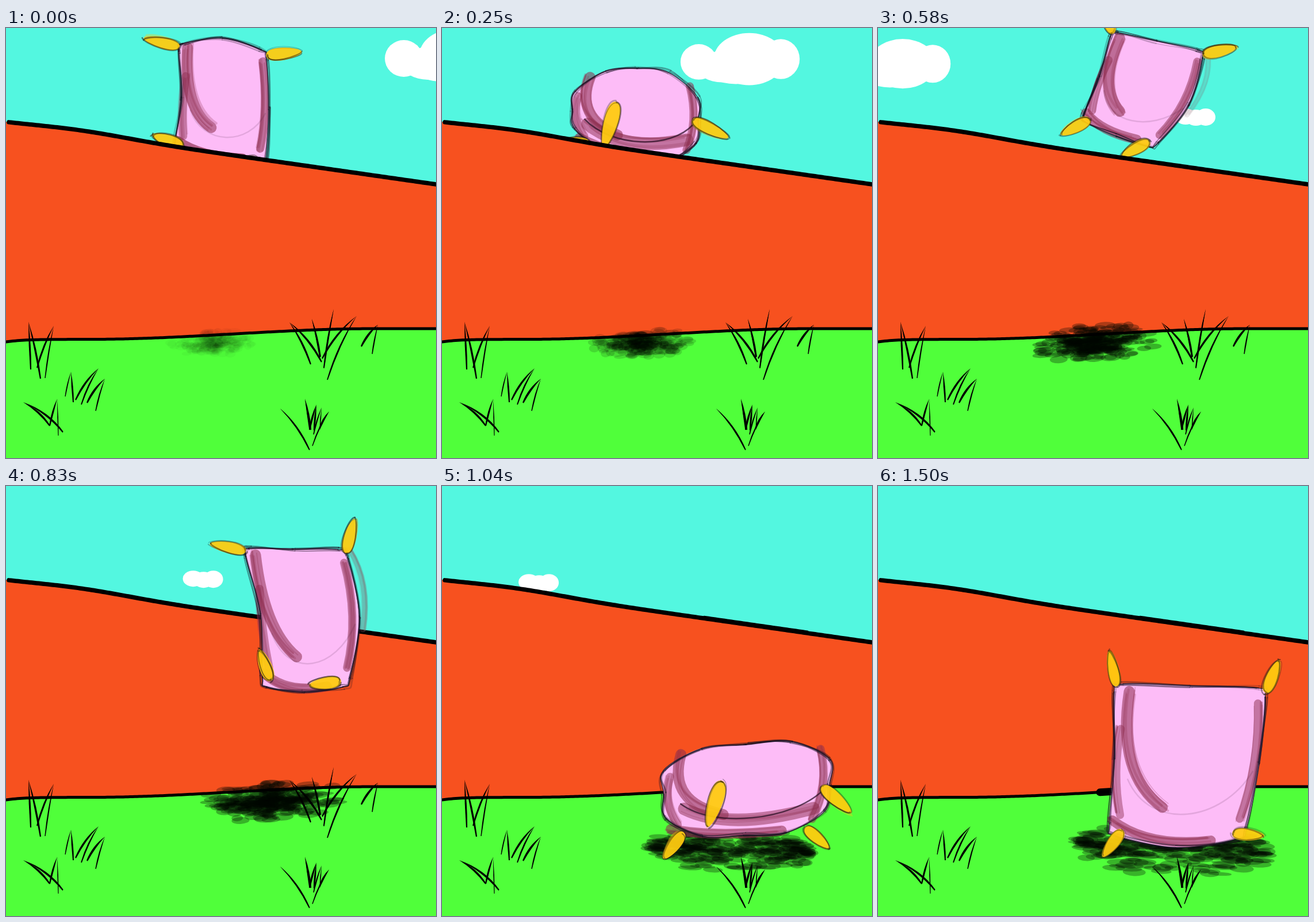
An HTML page with a canvas for the animation above (1.54 s loop, 748x748 px).

```html
<!DOCTYPE html>
<html lang="en">
<head>
<meta charset="utf-8">
<title>Bouncing pillow</title>
<style>
html, body { margin: 0; width: 100%; height: 100%; overflow: hidden; background: #53f7e0; }
canvas { display: block; width: 100vw; height: 100vh; }
</style>
</head>
<body>
<canvas id="stage" width="748" height="748"></canvas>
<script>
const ctx = document.getElementById('stage').getContext('2d');
const LOOP = 1540, FPS = 24, LAST = 36;
const SKY = '#53f7e0', HILL = '#f7511f', GRASS = '#50ff3a', PINK = '#fdbcf7';
const start = n => Math.round(n * 100 / FPS) * 10;
const clamp = x => Math.max(0, Math.min(1, x));
const smooth = x => { const t = clamp(x); return t * t * (3 - 2 * t); };

// Small seeded generator, so every drawing is repeatable
let seed = 1;
function rnd() {
  seed = (seed + 0x6D2B79F5) | 0;
  let t = Math.imul(seed ^ seed >>> 15, 1 | seed);
  t = t + Math.imul(t ^ t >>> 7, 61 | t) ^ t;
  return ((t ^ t >>> 14) >>> 0) / 4294967296;
}
const jit = a => (rnd() * 2 - 1) * a;

// Key poses. Corners, horns: clockwise from top left; bulge: top, right, bottom, left.
// flop is how far the top horns hang down over the squashed body.
const poses = [];
const pose = (n, corners, bulge, horns, flop) =>
  poses.push({ n, v: [...corners, ...bulge, ...horns, flop] });

pose(0, [298,30, 452,42, 450,240, 290,212], [18, 6, 0, -13], [193, -6, 150, 200], 0);
pose(6, [240,85, 438,90, 435,232, 240,200], [17, 10, 12, 14], [105, 26, 150, 180], 1);
pose(14, [406,6, 565,40, 478,207, 353,160], [0, 22, 4, -6], [250, -13, 152, 153], 0);
pose(20, [412,108, 588,110, 594,347, 444,347], [0, 23, 12, -15], [191, -75, 172, 250], 0);
pose(25, [388,462, 670,440, 655,600, 395,610], [1, 12, 2, 6], [107, 42, 41, 127], 1);
pose(30, [400,430, 668,430, 640,614, 390,605], [28, 16, 7, 8], [115, 56, 4, 141], 1);
pose(36, [410,343, 675,352, 637,610, 400,603], [0, 8, 22, -6], [258, -68, 5, 126], 0);

// Monotone cubic through the poses
const slope = (a, b, i) => (b.v[i] - a.v[i]) / (b.n - a.n);
function tangent(k, i) {
  if (!poses[k - 1] || !poses[k + 1]) return 0;
  const p = slope(poses[k - 1], poses[k], i), q = slope(poses[k], poses[k + 1], i);
  return p * q > 0 ? 2 * p * q / (p + q) : 0;
}
function tween(n) {
  let k = 0;
  while (k < poses.length - 2 && n >= poses[k + 1].n) k++;
  const a = poses[k], b = poses[k + 1], h = b.n - a.n, u = (n - a.n) / h, w = 1 - u;
  return a.v.map((p, i) => p * w * w * (1 + 2 * u) + b.v[i] * u * u * (3 - 2 * u)
    + h * u * w * (tangent(k, i) * w - tangent(k + 1, i) * u));
}

// Maps (u, v) of the unit square onto the bulging pillow
function surface(v) {
  const corner = i => [v[i % 4 * 2], v[i % 4 * 2 + 1]];
  const [tl, tr, br, bl] = [0, 1, 2, 3].map(corner);
  const push = [0, 1, 2, 3].map(i => {
    const a = corner(i), b = corner(i + 1), dx = b[0] - a[0], dy = b[1] - a[1];
    const k = v[8 + i] / Math.hypot(dx, dy);
    return [dy * k, -dx * k];
  });
  return (s, t) => [0, 1].map(i => {
    const across = 4 * s * (1 - s), down = 4 * t * (1 - t);
    return (tl[i] * (1 - s) + tr[i] * s) * (1 - t) + (bl[i] * (1 - s) + br[i] * s) * t
      + across * (push[0][i] * (1 - t) + push[2][i] * t)
      + down * (push[1][i] * s + push[3][i] * (1 - s));
  });
}

function ellipse(x, y, rx, ry) {
  ctx.beginPath();
  ctx.ellipse(x, y, rx, ry, 0, 0, 7);
  ctx.fill();
}

const ridge = x => 165 + .143 * x - 5.5 * Math.exp(-(((x - 130) / 120) ** 2));
const ground = x => 541.5 + 4.5 * Math.exp(-x / 30) - 18.5 * smooth((x - 150) / 490);

function curve(f, x0, x1, width, dy = 0) {
  ctx.beginPath();
  for (let x = x0; x <= x1; x += 4) ctx.lineTo(x, f(x) + dy);
  ctx.lineWidth = width;
  ctx.stroke();
}
function area(f, color) {
  ctx.fillStyle = color;
  ctx.beginPath();
  ctx.moveTo(0, 748);
  for (let x = 0; x <= 748; x += 4) ctx.lineTo(x, f(x));
  ctx.lineTo(748, 748);
  ctx.fill();
}

// Each tuft: foot, shared tip, other foot
const tufts = [
  [43,594, 39,511, 60,610], [68,609, 83,518, 54,591], [103,641, 113,598, 117,651],
  [121,647, 161,592, 131,655], [141,652, 172,610, 156,666], [99,703, 30,651, 76,692],
  [76,692, 89,645, 91,709], [528,734, 477,662, 527,732], [530,699, 520,645, 528,698],
  [528,699, 540,655, 536,700], [535,707, 549,660, 546,698], [545,698, 562,667, 533,727]];
const farTufts = [
  [530,585, 493,512, 549,581], [546,573, 532,506, 547,572], [553,592, 570,489, 553,591],
  [550,575, 610,501, 559,612], [618,554, 647,516, 637,567]];

function blade(x0, y0, x1, y1, w) {
  const dx = x1 - x0, dy = y1 - y0, len = Math.hypot(dx, dy), nx = -dy / len * w, ny = dx / len * w;
  const cx = x0 + dx * .5 + dx * .12, cy = y0 + dy * .5 - Math.abs(dx) * .12;
  ctx.beginPath();
  ctx.moveTo(x0, y0);
  ctx.quadraticCurveTo(cx + nx, cy + ny, x1 + nx * .4, y1 + ny * .4);
  ctx.lineTo(x1 - nx * .4, y1 - ny * .4);
  ctx.quadraticCurveTo(cx - nx, cy - ny, x0, y0);
  ctx.fill();
}
function drawTufts(list) {
  seed = 5;
  ctx.fillStyle = '#000';
  for (const [ax, ay, x, y, bx, by] of list) {
    blade(x, y, ax, ay, 1.4 + rnd() * 1.8);
    blade(x, y, bx, by, 1.4 + rnd() * 1.8);
  }
}

const BIG = [[33,53,33,32], [124,48,64,47], [181,48,34,36], [75,62,45,28], [100,60,60,33]];
const SMALL = [[18,15,18,14], [36,17,18,14], [53,16,17,15]];
function cloud(x, y, s, lobes) {
  ctx.fillStyle = '#fff';
  for (const [cx, cy, rx, ry] of lobes) ellipse(x + cx * s, y + cy * s, rx * s, ry * s);
}
function drawClouds(n) {
  cloud(659 - 32.1 * n - 1.43 * n * n, 1.3 * n, 1 - .006 * n, BIG);
  if (n < 28) cloud(517 - 34.9 * (n - 14), 139 + 1.2 * (n - 14), 1, SMALL);
}

// The shadow trails the pillow, and widens and darkens as it comes near
function drawShadow(n) {
  const v = tween(Math.max(0, n - 4)), fall = smooth((n - 20) / 5);
  const rx = 85 + 2.65 * n, ry = rx * .26;
  ctx.save();
  ctx.translate((v[0] + v[2] + v[4] + v[6]) / 4 - 12, 548 + 84 * fall);
  ctx.rotate(.1 * fall - .05);
  ctx.fillStyle = `rgba(0,8,0,${.03 + .27 * clamp(n / 14)})`;
  for (let i = 0; i < 280; i++) {
    const x = jit(.9) * rnd() ** (.7 * (1 - fall));
    const y = (rnd() + rnd() - 1) * (1 - x ** 4);
    ellipse(x * rx, y * ry, rx * (.07 + rnd() * .08), 3 + rnd() * 4);
  }
  ctx.restore();
}

// Closed smooth curve; each part is [from, control, control, to]
function spline(p) {
  const at = i => p[(i + p.length) % p.length];
  return p.map((a, i) => {
    const o = at(i - 1), b = at(i + 1), c = at(i + 2);
    return [...a, a[0] + (b[0] - o[0]) / 6, a[1] + (b[1] - o[1]) / 6,
      b[0] - (c[0] - a[0]) / 6, b[1] - (c[1] - a[1]) / 6, ...b];
  });
}

function brush(a, c, b, width, alpha, color = '140,46,78') {
  const stroke = (dx, dy, w, o) => {
    ctx.beginPath();
    ctx.moveTo(a[0] + dx, a[1] + dy);
    ctx.quadraticCurveTo(c[0] + dx, c[1] + dy, b[0] + dx, b[1] + dy);
    ctx.lineWidth = w;
    ctx.strokeStyle = `rgba(${color},${o})`;
    ctx.stroke();
  };
  stroke(0, 0, width, alpha);
  for (let i = 0; i < 6; i++) stroke(jit(width * .55), jit(width * .4), 1.5 + rnd() * 3, alpha * .45);
}

function drawHorn([bx, by], angle, length, w) {
  const r = angle * Math.PI / 180, dx = Math.cos(r), dy = Math.sin(r), nx = -dy * w, ny = dx * w;
  const tx = bx + dx * length, ty = by + dy * length;
  const side = (s, m) => ctx.bezierCurveTo(bx + nx * .8 * s + jit(m), by + ny * .8 * s + jit(m),
    tx + nx * .35 * s + jit(m), ty + ny * .35 * s + jit(m), tx + jit(m), ty + jit(m));
  for (let i = 0; i < 3; i++) {
    ctx.fillStyle = `rgba(255,203,16,${i ? .35 : .85})`;
    ctx.beginPath();
    ctx.moveTo(bx, by);
    side(1, i * 3);
    ctx.lineTo(tx, ty);
    ctx.bezierCurveTo(tx - nx * .35, ty - ny * .35, bx - nx * .8, by - ny * .8, bx, by);
    ctx.fill();
  }
  for (const s of [1, -1, 1, -1]) {
    ctx.strokeStyle = `rgba(30,25,20,${.2 + rnd() * .4})`;
    ctx.lineWidth = 1 + rnd() * 2;
    ctx.beginPath();
    ctx.moveTo(bx + jit(3), by + jit(3));
    side(s, 3);
    ctx.stroke();
  }
}

function drawPillow(n) {
  const v = tween(n), at = surface(v), flop = clamp(v[16]), r = .06 + .16 * flop;
  const rim = [r, .5, 1 - r];
  const body = [...rim.map(s => at(s, 0)), ...rim.map(s => at(1, s)),
    ...rim.map(s => at(1 - s, 1)), ...rim.map(s => at(0, 1 - s))];

  const air = clamp(1 - Math.abs(n - 18) / 6);
  if (air) brush(at(1.05, 0), at(1.15, .25), at(1.04, .6), 8, air * .4, '130,90,100');

  ctx.fillStyle = PINK;
  ctx.beginPath();
  ctx.moveTo(...body[0]);
  for (const c of spline(body)) ctx.bezierCurveTo(...c.slice(2));
  ctx.fill();

  brush(at(.1, .05), at(.02, .6), at(.36, .76), 19, .55);
  brush(at(.04, .3), at(-.01, .6), at(.07, .86), 14, .45);
  brush(at(.02, .91), at(.3, 1.02), at(.75, .97), 17, .55);
  brush(at(.95, .1), at(1, .5), at(.93, .86), 14, .5);
  if (flop > .1) brush(at(.12, .68), at(.4, .95), at(.92, .74), 22, .5 * flop);

  const from = at(.1, .62);
  ctx.strokeStyle = `rgba(40,15,35,${.12 + .6 * flop})`;
  ctx.lineWidth = 2.5;
  ctx.beginPath();
  ctx.moveTo(...from);
  ctx.bezierCurveTo(...at(.3, .92), ...at(.8, .86), ...at(.96, .55));
  ctx.stroke();

  for (let pass = 0; pass < 5; pass++) {
    const rough = pass ? 4 : 1;
    for (const c of spline(body.map(([x, y]) => [x + jit(rough), y + jit(rough)]))) {
      ctx.strokeStyle = `rgba(25,18,35,${pass ? .2 + rnd() * .35 : .75})`;
      ctx.lineWidth = 1 + rnd() * 2;
      ctx.beginPath();
      ctx.moveTo(c[0], c[1]);
      ctx.bezierCurveTo(...c.slice(2));
      ctx.stroke();
    }
  }

  drawHorn(at(.1, .95), v[15], 58, 25);
  drawHorn(at(.9, .95), v[14], 56, 24);
  drawHorn(at(1 - .05 * flop, .03 + .47 * flop), v[13], 62 + 8 * flop, 25);
  drawHorn(at(.02 + .33 * flop, .02 + .36 * flop), v[12], 64 + 20 * flop, 23 + 6 * flop);
}

function draw(n) {
  ctx.lineCap = ctx.lineJoin = 'round';
  ctx.fillStyle = SKY;
  ctx.fillRect(0, 0, 748, 748);
  drawClouds(n);
  seed = 97 + n * 31;
  if (n < 15) drawPillow(n);

  area(ridge, HILL);
  area(ground, GRASS);
  ctx.strokeStyle = '#000';
  curve(ridge, 5, 752, 7.5);
  if (n > 20) curve(ridge, 456, 638, 3, -3);
  drawShadow(n);
  ctx.strokeStyle = '#000';
  curve(ground, -4, 752, 5);
  if (n > 30) curve(ground, 386, 410, 13);

  drawTufts(tufts);
  if (n < 23) drawTufts(farTufts);
  seed = 97 + n * 31;
  if (n >= 15) drawPillow(n);
}

let shown = -1;
function tick(now) {
  const t = now % LOOP;
  let n = LAST;
  while (n && start(n) > t) n--;
  if (n !== shown) draw(shown = n);
  requestAnimationFrame(tick);
}
draw(0);
requestAnimationFrame(tick);
</script>
</body>
</html>
```
